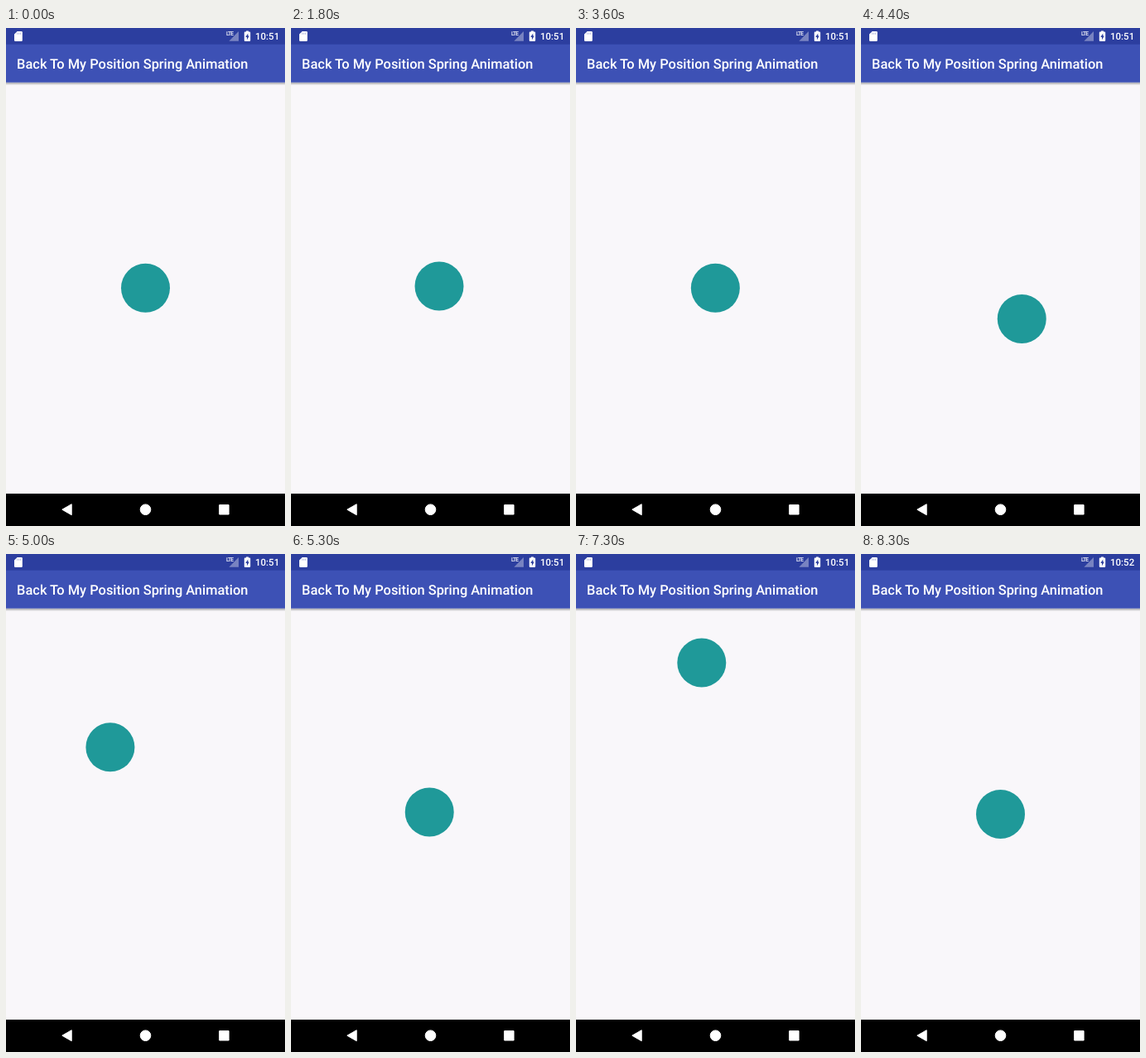
These frames come from a looping animation (337x600 px, 8400 ms). An HTML page:

```html
<!DOCTYPE html>
<html lang="en">
<head>
<meta charset="utf-8">
<title>Spring animation</title>
<style>
  html, body { margin: 0; width: 100%; height: 100%; overflow: hidden; background: #f9f7fa; }
  svg { display: block; width: 100%; height: 100%; }
  text { font-family: Roboto, sans-serif; font-weight: 500; fill: #fff; text-rendering: geometricPrecision; }
</style>
</head>
<body>
<svg viewBox="0 0 337 600">
  <defs>
    <linearGradient id="shade" x2="0" y2="1">
      <stop offset="0" stop-color="#000" stop-opacity=".34"/>
      <stop offset="1" stop-color="#000" stop-opacity="0"/>
    </linearGradient>
  </defs>
  <rect width="337" height="600" fill="#f9f7fa"/>

  <rect y="65.6" width="337" height="3.4" fill="url(#shade)"/>
  <rect y="19" width="337" height="46.6" fill="#3d51b5"/>
  <rect width="337" height="19.7" fill="#2c3e9f"/>
  <text x="13.1" y="49" font-size="16.4">Back To My Position Spring Animation</text>

  <g fill="#fff">
    <path d="M13.6 4H18.6Q19.8 4 19.8 5.2V14.8Q19.8 16 18.6 16H11.2Q10 16 10 14.8V7.6Z"/>
    <path d="M13.6 5.5V7.8M15.6 5.5V7.8M17.6 5.5V7.8" stroke="#2c3e9f" stroke-width=".6" opacity=".6"/>
    <path d="M281 4V15.8H269.4Z" opacity=".36"/>
    <text x="266" y="9.4" font-size="6.8" letter-spacing="-.9">LTE</text>
    <path d="M290 4V3.6H293V4.6H294.2Q295.2 4.6 295.2 5.6V15Q295.2 16 294.2 16H288.8Q287.8 16 287.8 15V5.6Q287.8 4.6 288.8 4.6H290Z"/>
    <path d="M292.3 6.4L289.3 11H291V14.2L293.8 9.6H292.3Z" fill="#2c3e9f"/>
  </g>
  <text id="clock" x="301" y="14.4" font-size="11.5">10:51</text>

  <circle id="ball" r="29.5" fill="#1f9999"/>

  <rect y="561" width="337" height="39"/>
  <g fill="#fff" stroke="#fff" stroke-linejoin="round">
    <path d="M67.8 580.2L79.2 573.7V586.7Z"/>
    <circle cx="168.5" cy="580.2" r="6.3"/>
    <rect x="257.7" y="574.6" width="11.4" height="11.4"/>
  </g>
</svg>
<script>
  const LOOP = 8400, TICK = 100;
  const REST = { x: 168.5, y: 313.3 };

  // A finger pulls the ball along a curve (bend, then end), holds it and lets go.
  const gestures = [
    { start: 1700, stop: 2600, release: 2820, bend: [45, -9], end: [131.2, -33.8] },
    { start: 4100, stop: 4800, release: 4914, bend: [22, 18], end: [81.5, 154] },
    { start: 6600, stop: 7300, release: 7410, bend: [-24, -66], end: [-16.7, -182.3] }
  ];

  // Underdamped spring released from 1 with no speed.
  const DAMPING = 0.2, FREQUENCY = Math.sqrt(1500);
  const RINGING = FREQUENCY * Math.sqrt(1 - DAMPING ** 2);
  function spring(seconds) {
    const decay = DAMPING * FREQUENCY;
    const angle = RINGING * seconds;
    return Math.exp(-decay * seconds) * (Math.cos(angle) + decay / RINGING * Math.sin(angle));
  }

  function offset(time) {
    const gesture = gestures.findLast(({ start }) => start <= time);
    if (!gesture) return [0, 0];
    const { start, stop, release, bend, end } = gesture;
    if (time > release) return end.map(value => value * spring((time - release) / 1000));
    const u = Math.min(1, (time - start) / (stop - start));
    return end.map((value, axis) => 2 * u * (1 - u) * bend[axis] + u * u * value);
  }

  const ball = document.getElementById("ball");
  const clock = document.getElementById("clock");

  function draw(now) {
    const time = Math.floor(now % LOOP / TICK) * TICK;
    const [dx, dy] = offset(time);
    ball.setAttribute("cx", REST.x + dx);
    ball.setAttribute("cy", REST.y + dy);
    clock.textContent = time < 8300 ? "10:51" : "10:52";
  }

  const origin = performance.now();
  function tick() {
    draw(performance.now() - origin);
    requestAnimationFrame(tick);
  }
  tick();
</script>
</body>
</html>
```
